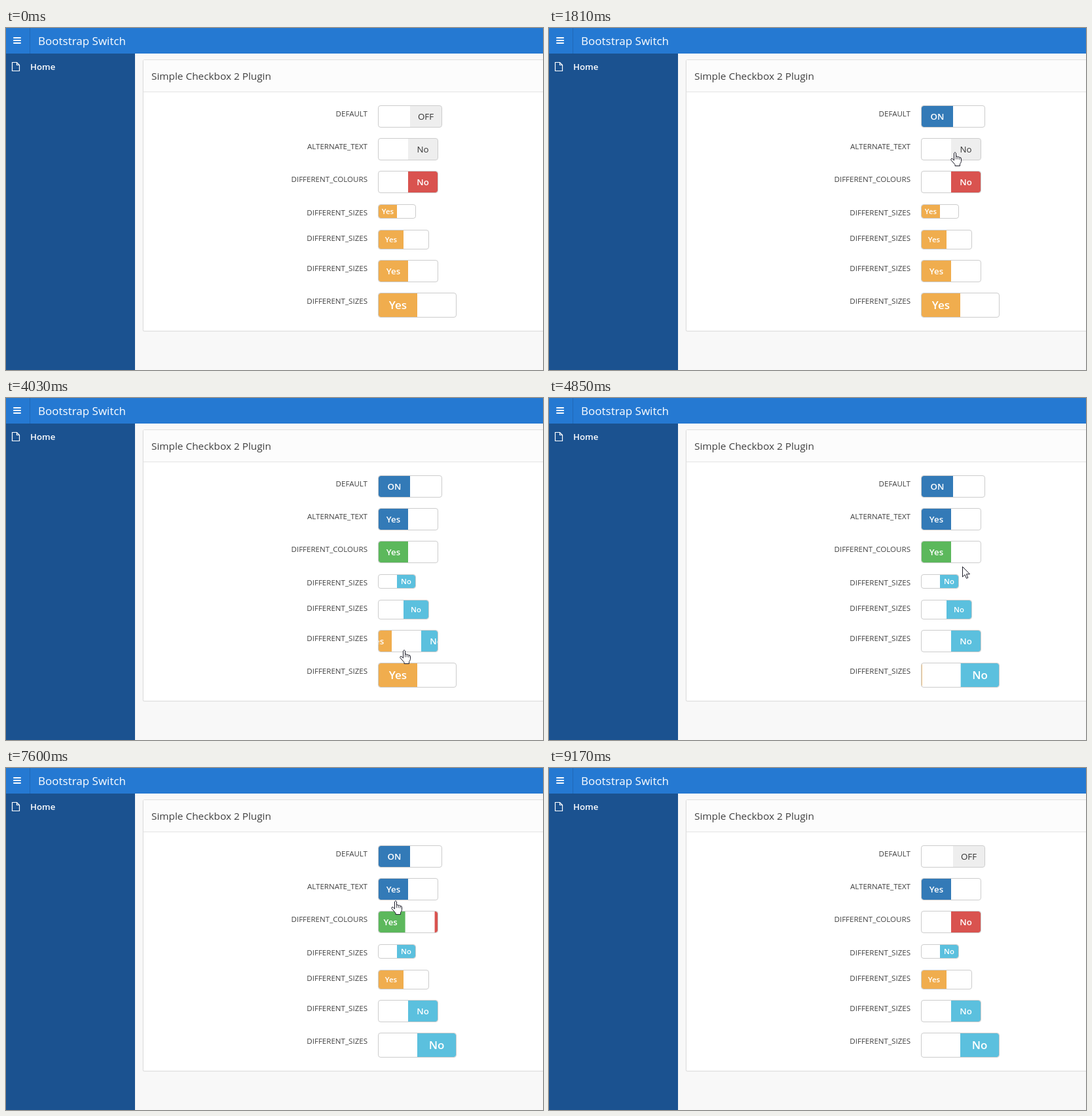
Write an HTML page that moves like this. It is 820 by 522 pixels and loops after 9740 ms.

```html
<!DOCTYPE html>
<html lang="en">
<head>
<meta charset="utf-8">
<title>Bootstrap Switch</title>
<style>
  html, body { margin: 0; width: 100%; height: 100%; overflow: hidden; background: #f8f8f8; }
  svg { display: block; width: 820px; height: 522px; font-family: "Open Sans", "Noto Sans", sans-serif; }
</style>
</head>
<body>
<svg viewBox="0 0 820 522" xmlns="http://www.w3.org/2000/svg">
  <rect width="820" height="522" fill="#f8f8f8"/>
  <rect x="208.5" y="48.5" width="640" height="415" rx="2" fill="#ebebeb"/>
  <rect x="209.5" y="48.5" width="640" height="414" rx="2" fill="#fff" stroke="#dfdfdf"/>
  <rect x="210" y="49" width="610" height="48" fill="#fcfcfc"/>
  <rect x="210" y="97" width="610" height="1" fill="#e4e4e4"/>
  <text x="222" y="79" font-size="15.35" fill="#404040">Simple Checkbox 2 Plugin</text>

  <rect y="39" width="197" height="483" fill="#1b5290"/>
  <rect width="820" height="39" fill="#2579d2"/>
  <rect x="36" width="1" height="39" fill="#2069b7"/>
  <path d="M12 15h10M12 19h10M12 23h10" stroke="#fff" stroke-width="2" stroke-linecap="round"/>
  <text x="49" y="26" font-size="17" fill="#fff">Bootstrap Switch</text>
  <path d="M9.5 52.5h7l4 4v9h-11zM16.5 52.5v4h4" fill="none" stroke="#fff" stroke-width="1.2"/>
  <text x="37" y="64" font-size="13.25" font-weight="600" fill="#fff">Home</text>

  <g id="rows"></g>
  <g id="cursor" fill="#fff" stroke="#1c1c28" stroke-linejoin="round">
    <path id="arrow" d="M.5.5V16L4 12.7 6.5 18.3 8.8 17.3 6.4 11.8H11.5Z"/>
    <g id="hand" transform="translate(-6 0)">
      <path d="M5.5 13V2Q7-.8 8.5 2V7.5Q10.2 5.8 11.2 7.8Q13 6.8 13.9 8.6Q16.5 8 16.5 11V14.5Q16 17 14.5 18.5V21.5H7V19.5L1 12.6Q.5 9.4 3 10.6Z"/>
      <path d="M8.5 7.5v4M11.2 8v3.5M13.9 9v3" fill="none" stroke-width=".8"/>
    </g>
  </g>
</svg>
<script>
const LOOP = 9740, SLIDE = 500, MOVE = 500, WAIT = 100, LEFT = 569;
const SHOW = 70, HIDE = 9150;
const BLUE = '#337ab7', GRAY = '#eee', GREEN = '#5cb85c',
      RED = '#d9534f', ORANGE = '#f0ad4e', CYAN = '#5bc0de';
const $ = id => document.getElementById(id);

// half: width of one handle
const make = (label, y, on, off, start, half = 45, h = 34, size = 13.3) =>
  ({ label, y, on, off, start, half, h, size });
const sized = (...shape) =>
  make('DIFFERENT_SIZES', shape[0], ['Yes', ORANGE], ['No', CYAN], 1, ...shape.slice(1));

const switches = [
  make('DEFAULT', 118, ['ON', BLUE], ['OFF', GRAY], 0, 48),
  make('ALTERNATE_TEXT', 168, ['Yes', BLUE], ['No', GRAY], 0),
  make('DIFFERENT_COLOURS', 218, ['Yes', GREEN], ['No', RED], 0),
  sized(269, 28, 22, 11.4),
  sized(308, 38, 30, 11.4),
  sized(354),
  sized(404, 59, 38, 17)
];

// Pointer stops: arrival time, tip position; a press follows after WAIT
const go = (t, x, y) => ({ t, x, y, leave: t });
const press = (t, x, y) => ({ t, x, y, leave: t + WAIT, press: true });
const stops = [
  go(SHOW, 430, 474), go(250, 417, 320),
  press(1200, 650, 128), press(1765, 619, 189), press(2380, 610, 241),
  press(3050, 594, 291), press(3410, 598, 324), press(3770, 605, 371), press(4320, 612, 415),
  go(4850, 631, 257), press(5000, 637, 239), go(5250, 628, 203), press(5400, 616, 230),
  go(6030, 605, 336), press(6180, 619, 336), go(6900, 597, 218),
  press(7450, 594, 233), go(7600, 594, 202), press(8100, 630, 132),
  go(8650, 650, 290), go(HIDE, 702, 505)
];

const over = (s, p) =>
  p.x >= LEFT - 1 && p.x <= LEFT + s.half * 2 + 1 && p.y >= s.y && p.y <= s.y + s.h;
for (const s of switches)
  s.clicks = stops.filter(p => p.press && over(s, p)).map(p => p.leave);

function handle([text, fill], x, s) {
  const plain = fill === GRAY;
  return `<rect x="${x}" y="${s.y + 1}" width="${s.half}" height="${s.h - 2}" fill="${fill}"/>
    <text x="${x + s.half / 2}" y="${s.y + s.h / 2 + s.size * .37}" font-size="${s.size}"
      font-weight="${plain ? 400 : 600}" fill="${plain ? '#333' : '#fff'}" text-anchor="middle">${text}</text>`;
}

$('rows').innerHTML = switches.map((s, i) => {
  const w = s.half * 2;
  return `<text x="552" y="${s.y + 16.5}" font-size="11.55" fill="#404040" text-anchor="end">${s.label}</text>
    <clipPath id="clip${i}"><rect x="${LEFT}" y="${s.y + 1}" width="${w}" height="${s.h - 2}" rx="3"/></clipPath>
    <g clip-path="url(#clip${i})"><g id="slide${i}">
      ${handle(s.on, LEFT, s)}${handle(s.off, LEFT + w, s)}
    </g></g>
    <rect x="${LEFT - .5}" y="${s.y + .5}" width="${w + 1}" height="${s.h - 1}" rx="3.5" fill="none" stroke="#ccc"/>`;
}).join('');

const clamp = p => Math.min(1, Math.max(0, p));
const smooth = p => p * p * (3 - 2 * p);

// CSS "ease": cubic-bezier(.25, .1, .25, 1)
function ease(p) {
  const bez = (a, b, u) => 3 * a * u * (1 - u) ** 2 + 3 * b * u * u * (1 - u) + u ** 3;
  let lo = 0, hi = 1;
  for (let i = 0; i < 20; i++) {
    const mid = (lo + hi) / 2;
    if (bez(.25, .25, mid) < p) lo = mid; else hi = mid;
  }
  return bez(.1, 1, hi);
}

// 0 is off, 1 is on
function position(s, t) {
  let from = s.start, to = s.start, since = -SLIDE;
  const at = time => from + (to - from) * ease(clamp((time - since) / SLIDE));
  for (const c of s.clicks.filter(c => c <= t)) {
    from = at(c);
    to = 1 - to;
    since = c;
  }
  return at(t);
}

function pointer(t) {
  const i = stops.findIndex(p => p.t > t);
  if (i < 1) return stops[0];
  const a = stops[i - 1], b = stops[i];
  const begin = Math.max(a.leave, b.t - MOVE);
  const p = smooth(clamp((t - begin) / (b.t - begin)));
  return { x: Math.round(a.x + (b.x - a.x) * p), y: Math.round(a.y + (b.y - a.y) * p) };
}

const show = (id, on) => { $(id).style.display = on ? '' : 'none'; };

function draw(t) {
  switches.forEach((s, i) => {
    const shift = (position(s, t) - 1) * s.half;
    $('slide' + i).setAttribute('transform', `translate(${shift} 0)`);
  });
  const tip = pointer(t);
  const hover = switches.some(s => over(s, tip));
  $('cursor').setAttribute('transform', `translate(${tip.x} ${tip.y})`);
  show('cursor', t >= SHOW && t < HIDE);
  show('hand', hover);
  show('arrow', !hover);
}

const began = performance.now();
function tick() {
  draw((performance.now() - began) % LOOP);
  requestAnimationFrame(tick);
}
tick();
</script>
</body>
</html>
```
